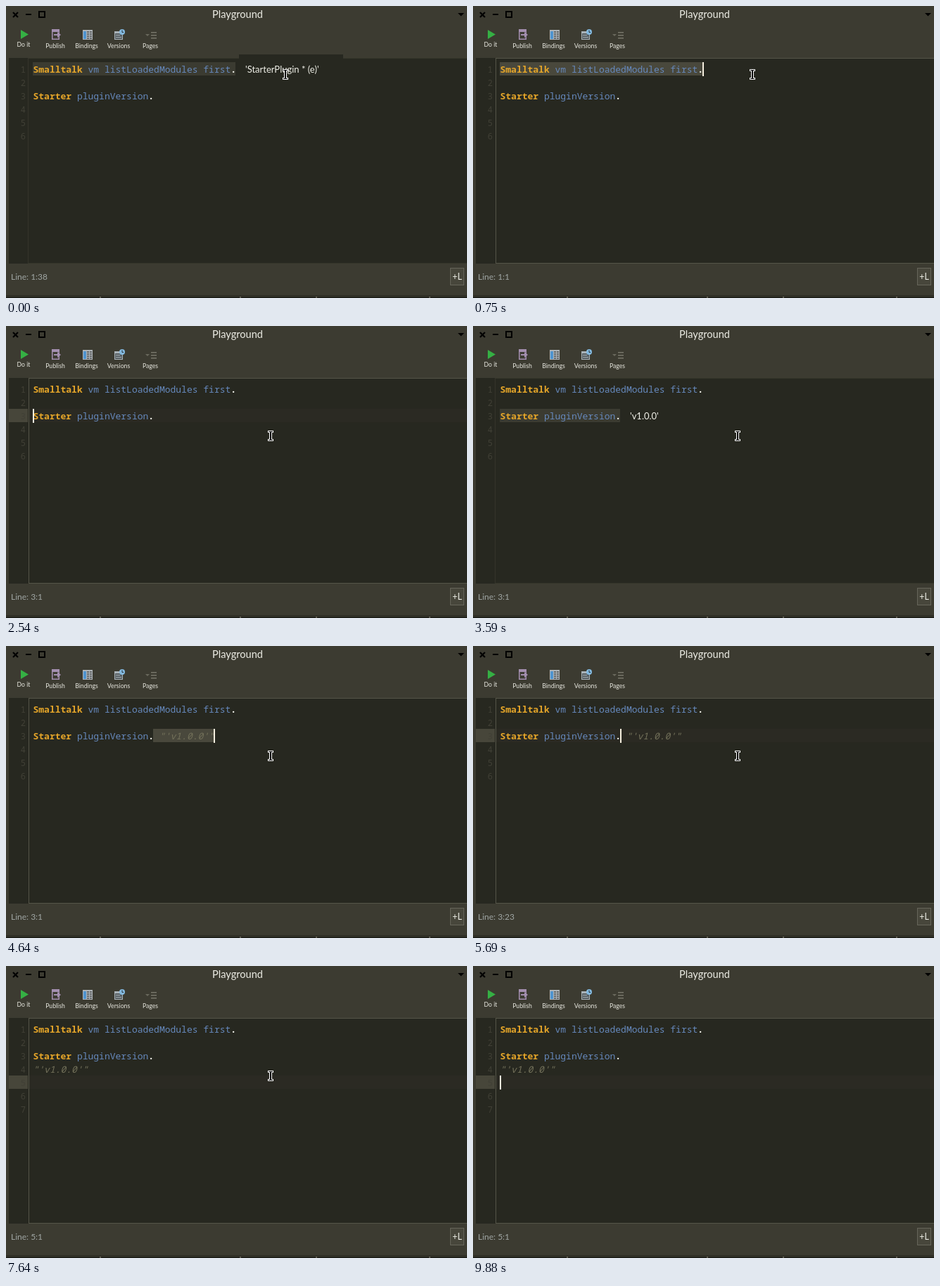
An HTML page with a canvas that plays this animation: 655 by 416 pixels, repeating every 9.98 s.

```html
<!DOCTYPE html>
<html lang="en">
<head>
<meta charset="utf-8">
<title>Playground</title>
<style>
  html, body { margin: 0; width: 100%; height: 100%; overflow: hidden; background: #3c3b31; }
  canvas { display: block; }
</style>
</head>
<body>
<canvas id="stage" width="655" height="416"></canvas>
<script>
const ctx = document.getElementById('stage').getContext('2d');
const LOOP = 9980, CHAR = 7.8, TEXT_X = 38.5;
const MONO = '"Noto Sans Mono", "DejaVu Sans Mono", monospace';
const SANS = 'Lato, "Open Sans", sans-serif';
const WINDOW = '#3c3b31', EDITOR = '#272820';
const KEYWORD = '#e6a629', MESSAGE = '#6689bd', PLAIN = '#f4f4ec', COMMENT = '#73715a';

// Each step changes only the listed properties.
// caret: [line, column], sel: [line, from, to], comment: [line, column]
const steps = [
  [0, { status: '1:38', sel: [1, 0, 37], popup: "'StarterPlugin * (e)'", mouse: [397, 97], lines: 6 }],
  [750, { status: '1:1', popup: null, caret: [1, 37] }],
  [1640, { mouse: [380, 149] }],
  [1790, { mouse: [376, 156], caret: null }],
  [2390, { sel: null, row: 2, caret: [2, 0] }],
  [2540, { row: 3, caret: [3, 0], status: '3:1' }],
  [3590, { row: 0, caret: null, sel: [3, 0, 22], popup: "'v1.0.0'" }],
  [4640, { popup: null, comment: [3, 23], sel: [3, 22, 33], caret: [3, 33] }],
  [4790, { status: '3:34' }],
  [5390, { sel: null, row: 3, caret: [3, 21], status: '3:22' }],
  [5690, { caret: [3, 22], status: '3:23' }],
  [5840, { caret: [3, 23] }],
  [5990, { status: '3:24' }],
  [6140, { comment: [4, 0], row: 4, caret: [4, 0], lines: 7 }],
  [6290, { status: '4:1' }],
  [6740, { row: 5, caret: [5, 0], status: '5:1' }],
  [7640, { caret: null }],
  [8090, { mouse: [358, 150] }],
  [8240, { mouse: [455, 193] }],
  [8390, { mouse: null, caret: [5, 0] }],
  [9140, { caret: null }],
  [9880, { caret: [5, 0] }]
];

const lineTop = line => 80 + 19 * (line - 1);
const columnX = column => Math.floor(38 + CHAR * column);

function rect(x, y, w, h, color) {
  ctx.fillStyle = color;
  ctx.fillRect(x, y, w, h);
}

function frame(x, y, w, h, color, weight = 1) {
  ctx.strokeStyle = color;
  ctx.lineWidth = weight;
  ctx.strokeRect(x + weight / 2, y + weight / 2, w - weight, h - weight);
}

function polygon(color, ...points) {
  ctx.fillStyle = color;
  ctx.beginPath();
  points.forEach(p => ctx.lineTo(...p));
  ctx.fill();
}

function polyline(color, weight, ...points) {
  ctx.strokeStyle = color;
  ctx.lineWidth = weight;
  ctx.beginPath();
  points.forEach(p => ctx.lineTo(...p));
  ctx.stroke();
}

function label(text, x, y, size, color, align = 'left') {
  ctx.font = `${size}px ${SANS}`;
  ctx.textAlign = align;
  ctx.fillStyle = color;
  ctx.fillText(text, x, y);
}

function code(text, line, column, color, style = '') {
  ctx.font = `${style} 13px ${MONO}`;
  ctx.textAlign = 'left';
  ctx.fillStyle = color;
  ctx.fillText(text, TEXT_X + CHAR * column, lineTop(line) + 15);
}

function drawTitleBar() {
  polyline('#000', 2.2, [10, 9], [17, 16]);
  polyline('#000', 2.2, [17, 9], [10, 16]);
  rect(28, 11, 8, 2, '#000');
  frame(46, 7, 10, 10, '#000', 2);
  polygon('#000', [642, 10], [651, 10], [646.5, 14.5]);
  label('Playground', 329, 17, 14.6, '#ecece4', 'center');
}

function drawToolbar() {
  polygon('#35b044', [21, 34], [32, 40.5], [21, 47]);

  const lilac = '#a48fb0';
  frame(65, 33, 11, 15, lilac, 1.5);
  rect(65, 33, 11, 4, lilac);
  rect(68, 40, 6, 2, lilac);
  polygon(lilac, [73, 37], [78, 41], [73, 45]);

  rect(109, 34, 14, 14, '#aeb4b8');
  rect(110, 36, 4, 11, '#4f94cf');
  for (const x of [115, 119]) {
    for (let y = 36; y < 47; y += 3) rect(x, y, 3, 2, '#66696a');
  }

  rect(154, 36, 12, 12, '#a9b2b8');
  rect(155, 39, 10, 8, '#565e62');
  rect(156, 41, 6, 1, '#a9b2b8');
  rect(156, 44, 8, 1, '#a9b2b8');
  ctx.fillStyle = '#83b9df';
  ctx.beginPath();
  ctx.arc(165, 37, 4, 0, 7);
  ctx.fill();
  polyline('#26333b', 1, [165, 34.5], [165, 37.5], [167, 37.5]);

  polygon('#69685c', [198, 40], [204, 40], [201, 43]);
  for (const y of [37, 41, 45]) rect(206, y, 8, 1.5, '#77766a');

  [['Do it', 25, 58], ['Publish', 70, 60], ['Bindings', 114.5, 60],
   ['Versions', 160, 60], ['Pages', 205, 60]]
    .forEach(([text, x, y]) => label(text, x, y, 8.7, '#e6e6de', 'center'));
}

function drawEditor(s) {
  const focused = !s.popup;
  const border = focused ? '#555548' : '#35352b';
  rect(4, 74, 651, 293, EDITOR);
  if (s.row) {
    rect(4, lineTop(s.row), 27, 19, '#47463a');
    rect(33, lineTop(s.row), 622, 19, '#2b2a23');
  }
  rect(32, 74, 623, 1, border);
  rect(32, 366, 623, 1, border);
  rect(focused ? 32 : 31, 74, 1, 293, border);

  ctx.font = `12px ${MONO}`;
  ctx.textAlign = 'right';
  ctx.fillStyle = '#414036';
  for (let n = 1; n <= s.lines; n++) ctx.fillText(n, 28, lineTop(n) + 15);

  if (s.sel) {
    const [line, from, to] = s.sel;
    rect(columnX(from), lineTop(line), columnX(to) - columnX(from), 19, focused ? '#49483c' : '#3b3b31');
  }
  code('Smalltalk', 1, 0, KEYWORD, 'bold');
  code('vm listLoadedModules first', 1, 10, MESSAGE);
  code('.', 1, 36, PLAIN, 'bold');
  code('Starter', 3, 0, KEYWORD, 'bold');
  code('pluginVersion', 3, 8, MESSAGE);
  code('.', 3, 21, PLAIN, 'bold');
  if (s.comment) code(`"'v1.0.0'"`, ...s.comment, COMMENT, 'italic');
  if (s.caret) rect(columnX(s.caret[1]), lineTop(s.caret[0]), 2, 20, '#f4eede');
}

function drawPopup(s) {
  const [line, , column] = s.sel;
  const x = columnX(column) + 5, y = lineTop(line) - 11;
  rect(x, y, s.popup.length * 6 + 22, 42, EDITOR);
  label(s.popup, x + 9, y + 26, 13, '#f0f0e8');
}

function drawStatus(s) {
  label('Line: ' + s.status, 7, 390, 12, '#a0a6a4');
  rect(631, 373, 20, 25, '#47463b');
  frame(631, 373, 20, 25, '#66655a');
  label('+L', 641, 390, 12.4, '#f0f0e8', 'center');
  rect(0, 412, 655, 1, '#2a2a22');
  rect(0, 414, 655, 2, '#20201a');
  for (const x of [133, 332, 440, 601]) rect(x, 414, 2, 2, '#5b5a4e');
}

function drawBeam(x, y, grow, color) {
  const edge = 3 + grow, thick = 1 + 2 * grow;
  rect(x - edge, y - 6 - grow, 2 * edge, thick, color);
  rect(x - edge, y + 6 - grow, 2 * edge, thick, color);
  rect(x - 1 - grow, y - 6, 2 + 2 * grow, 13, color);
}

function drawMouse([x, y]) {
  drawBeam(x, y, 1, '#fff');
  drawBeam(x, y, 0, '#000');
}

function draw() {
  const time = performance.now() % LOOP;
  const state = Object.assign({}, ...steps.filter(([at]) => at <= time).map(([, change]) => change));
  rect(0, 0, 655, 416, WINDOW);
  drawTitleBar();
  drawToolbar();
  drawEditor(state);
  if (state.popup) drawPopup(state);
  drawStatus(state);
  if (state.mouse) drawMouse(state.mouse);
  requestAnimationFrame(draw);
}
draw();
</script>
</body>
</html>
```
